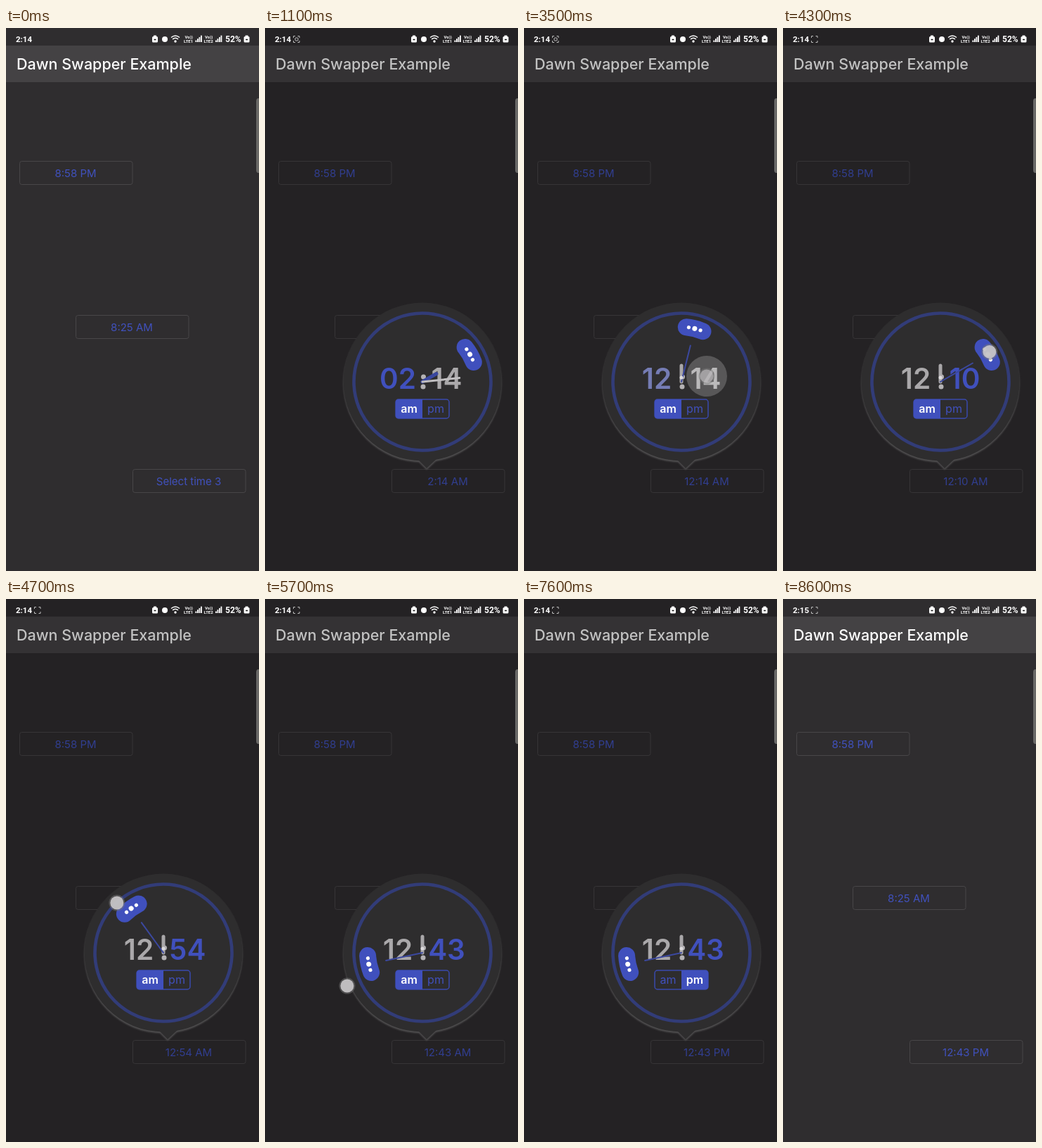
Recreate the animation shown at these times as an HTML page. Size 360 px wide and 772 px high, loop 9000 ms.

```html
<!DOCTYPE html>
<html lang="en">
<head>
<meta charset="utf-8">
<title>Time picker</title>
<style>
  html, body { margin: 0; width: 100%; height: 100%; overflow: hidden; background: #2f2d2f; }
  svg { display: block; width: 360px; height: 772px; font-family: Inter, sans-serif; }
  .bold { font-weight: 600; }
  .mid { text-anchor: middle; }
  .button rect { fill: none; stroke: #484648; }
  .button text { fill: #4051bd; font-size: 15px; text-anchor: middle; }
  .bubble { fill: #2e2d2e; filter: drop-shadow(0 2px 1px #545354); }
  #status { fill: #fff; font-family: Roboto, sans-serif; font-weight: 700; }
</style>
</head>
<body>
<svg viewBox="0 0 360 772">
  <rect width="360" height="772" fill="#2f2d2f"/>
  <rect y="25" width="360" height="52" fill="#444244"/>
  <text x="15" y="58.5" font-size="21.5" font-weight="500" fill="#fff">Dawn Swapper Example</text>
  <g id="scene"></g>
  <path d="M360 100h-1q-3 0-3 4v98q0 4 3 4h1z" fill="#6a6967"/>
  <g id="status"></g>
</svg>
<script>
const LOOP = 9000, STEP = 100, CX = 224, CY = 503;
const BLUE = [64, 80, 189], GREY = [170, 168, 170];
const scene = document.getElementById('scene');
const statusBar = document.getElementById('status');

// Piecewise linear value from [time, value] points.
function track(t, ...points) {
  let [t0, v0] = points[0];
  for (const [t1, v1] of points) {
    if (t < t1) return t <= t0 ? v0 : v0 + (v1 - v0) * (t - t0) / (t1 - t0);
    [t0, v0] = [t1, v1];
  }
  return v0;
}

const mix = (a, b, k) => `rgb(${a.map((v, i) => Math.round(v + (b[i] - v) * k))})`;

function polar(degrees, radius) {
  const a = degrees * Math.PI / 180;
  return [CX + radius * Math.sin(a), CY - radius * Math.cos(a)];
}

const hourAngle = t => track(t, [1600, 60], [2100, 0]);
const minuteAngle = t => t < 3400 ? 84 : track(t,
  [3400, 0], [3500, 14], [3900, 84], [4200, 84], [4700, -36], [5000, -66], [5600, -102]);

const touches = [
  { from: 100, to: 100, at: () => [260, 645] },
  { from: 1600, to: 2300, at: t => polar(hourAngle(t), 87) },
  { from: 3400, to: 3600, at: () => [260, 495], halo: true },
  { from: 4100, to: 6100, at: t => polar(
    minuteAngle(t) - track(t, [4200, 0], [4700, 7], [5600, 11.7]),
    track(t, [4200, 78], [4700, 97], [5600, 117])) },
  { from: 7100, to: 7200, at: () => [243, 542], halo: true },
  { from: 8000, to: 8000, at: () => [218, 705] }
];

function drawTouch(touch, t) {
  const alpha = t < touch.from ? 0 : track(t, [touch.to, 1], [touch.to + 200, 0]);
  if (!alpha) return '';
  const [x, y] = touch.at(t);
  const halo = touch.halo ? `<circle cx="${x}" cy="${y}" r="29" fill="#fff" opacity=".2"/>` : '';
  return `<g opacity="${alpha}">${halo}
    <circle cx="${x}" cy="${y}" r="11.5" fill="#777" opacity=".5"/>
    <circle cx="${x}" cy="${y}" r="9.5" fill="#c9c7c9" opacity="${touch.halo ? .6 : .92}"/></g>`;
}

const button = (x, y, label) => `<g class="button">
  <rect x="${x}" y="${y}" width="160.5" height="33" rx="3"/>
  <text x="${x + 79.5}" y="${y + 22}">${label}</text></g>`;

const hand = (angle, length, width, color) => {
  const [x, y] = polar(angle, length);
  return `<path d="M${CX} ${CY}L${x} ${y}" stroke="${color}" stroke-width="${width}" stroke-linecap="round"/>`;
};

function dragger(angle) {
  const [x0, y0] = polar(-9, 78), [x1, y1] = polar(9, 78);
  const dots = [-6.3, 0, 6.3].map(a => {
    const [x, y] = polar(a, 78);
    return `<circle cx="${x}" cy="${y}" r="${a ? 2.6 : 3.5}" fill="#fff"/>`;
  }).join('');
  return `<g transform="rotate(${angle} ${CX} ${CY})">
    <path d="M${x0} ${y0}A78 78 0 0 1 ${x1} ${y1}" fill="none" stroke="#4050bd"
      stroke-width="24" stroke-linecap="round"/>${dots}</g>`;
}

function meridiem(isPm) {
  const label = (x, text, on) =>
    `<text class="mid${on ? ' bold' : ''}" x="${x}" y="547" font-size="16" fill="${on ? '#fff' : '#4050bd'}">${text}</text>`;
  const half = isPm ? 'M224 528h34q4 0 4 4v19q0 4-4 4h-34z' : 'M224 528h-34q-4 0-4 4v19q0 4 4 4h34z';
  return `<rect x="186" y="528" width="76" height="27" rx="4" fill="none" stroke="#3a49ad" stroke-width="1.5"/>
    <path d="${half}" fill="#4050bd"/>${label(205, 'am', !isPm)}${label(243, 'pm', isPm)}`;
}

function picker(t, hour, minute, isPm) {
  const toMinutes = track(t, [3400, 0], [3600, 1]);
  const minutesOn = track(t, [3500, 0], [3800, 1]);
  const hourColor = mix(BLUE, GREY, toMinutes);
  const minuteColor = mix(GREY, BLUE, minutesOn);
  const digits = (x, n, color) =>
    `<text class="mid bold" x="${x}" y="513" font-size="40.5" fill="${color}">${String(n).padStart(2, '0')}</text>`;
  const editing = t >= 3400;
  return `<g class="bubble"><circle cx="${CX}" cy="${CY}" r="112.5"/><path d="M216 612L230 626L245 612Z"/></g>
    <circle cx="${CX}" cy="${CY}" r="97.5" fill="none" stroke="#323c78" stroke-width="4.6"/>
    ${digits(189, hour, hourColor)}${digits(258.5, minute, minuteColor)}
    <circle cx="225.5" cy="496" r="3.5" fill="#b4b2b4"/><circle cx="225" cy="510" r="3.5" fill="#b4b2b4"/>
    ${hand(hourAngle(t), 23, 5, editing ? '#a9a7a9' : '#3a479f')}
    ${hand(minuteAngle(t), 53, editing ? 2 : 3, editing ? '#3b489f' : '#c0bec0')}
    <circle cx="${CX}" cy="497" r="2.5" fill="#dddbdd" opacity="${editing ? 1 : 0}"/>
    ${dragger(editing ? minuteAngle(t) : hourAngle(t))}${meridiem(isPm)}`;
}

function drawScene(t) {
  const hour = (Math.round(hourAngle(t) / 30) + 11) % 12 + 1;
  const minute = t < 3900 ? 14 : (Math.round(minuteAngle(t) / 6) + 60) % 60;
  const isPm = t >= 7200;
  const open = track(t, [500, 0], [1000, 1], [7900, 1], [8400, 0]);
  const chosen = t < 600 ? 'Select time 3'
    : `${hour}:${String(minute).padStart(2, '0')} ${isPm ? 'PM' : 'AM'}`;
  scene.innerHTML = button(19.5, 189.5, '8:58 PM') + button(99.5, 408.5, '8:25 AM')
    + button(180.5, 627.5, chosen)
    + `<rect width="360" height="772" opacity="${open * .24}"/>`
    + (open ? `<g opacity="${open}">${picker(t, hour, minute, isPm)}</g>` : '')
    + touches.map(touch => drawTouch(touch, t)).join('');
}

function drawStatus(t) {
  const text = (x, y, size, value) => `<text x="${x}" y="${y}" font-size="${size}">${value}</text>`;
  const bars = x => [0, 1, 2, 3].map(i =>
    `<rect x="${x + i * 2.5}" y="${17.5 - i * 2.3}" width="1.8" height="${2.5 + i * 2.3}"/>`).join('');
  const signal = (x, n) => text(x + 1.5, 15, 6, 'Vo))') + text(x, 21, 6, 'LTE' + n) + bars(x + 16.5);
  const battery = (x, height) =>
    `<rect x="${x + 2}" y="10.5" width="4" height="2"/><rect x="${x}" y="12" width="8" height="${height}" rx="1.5"/>
     <path d="M${x + 2.5} 16.5h3" stroke="#111" stroke-width="1.5"/>`;
  const capture = t < 200 ? '' : `<g fill="none" stroke="#bbb">
    <path d="M40.5 14v-2.5h2.5M46.5 11.5h2.5v2.5M49 18v2.5h-2.5M43 20.5h-2.5v-2.5"/>
    ${t < 4100 ? '<rect x="43" y="14" width="4" height="4" rx="1"/>' : ''}</g>`;
  statusBar.innerHTML = text(14, 20, 11.5, t < 8200 ? '2:14' : '2:15') + capture
    + battery(208, 8.5) + '<circle cx="226" cy="16" r="4"/>'
    + `<g fill="none" stroke="#fff" stroke-width="1.5">
       <path d="M235 13.5q6-5 12 0M237 16q4-3.5 8 0"/></g><circle cx="241" cy="19" r="1.7"/>`
    + signal(253, 1) + signal(281.5, 2) + text(312, 20, 12, '52%') + battery(338.5, 8.5);
}

let shown = -1;
function frame(now) {
  const t = Math.floor(now % LOOP / STEP) * STEP;
  if (t !== shown) {
    shown = t;
    drawScene(t);
    drawStatus(t);
  }
  requestAnimationFrame(frame);
}
frame(0);
</script>
</body>
</html>
```
